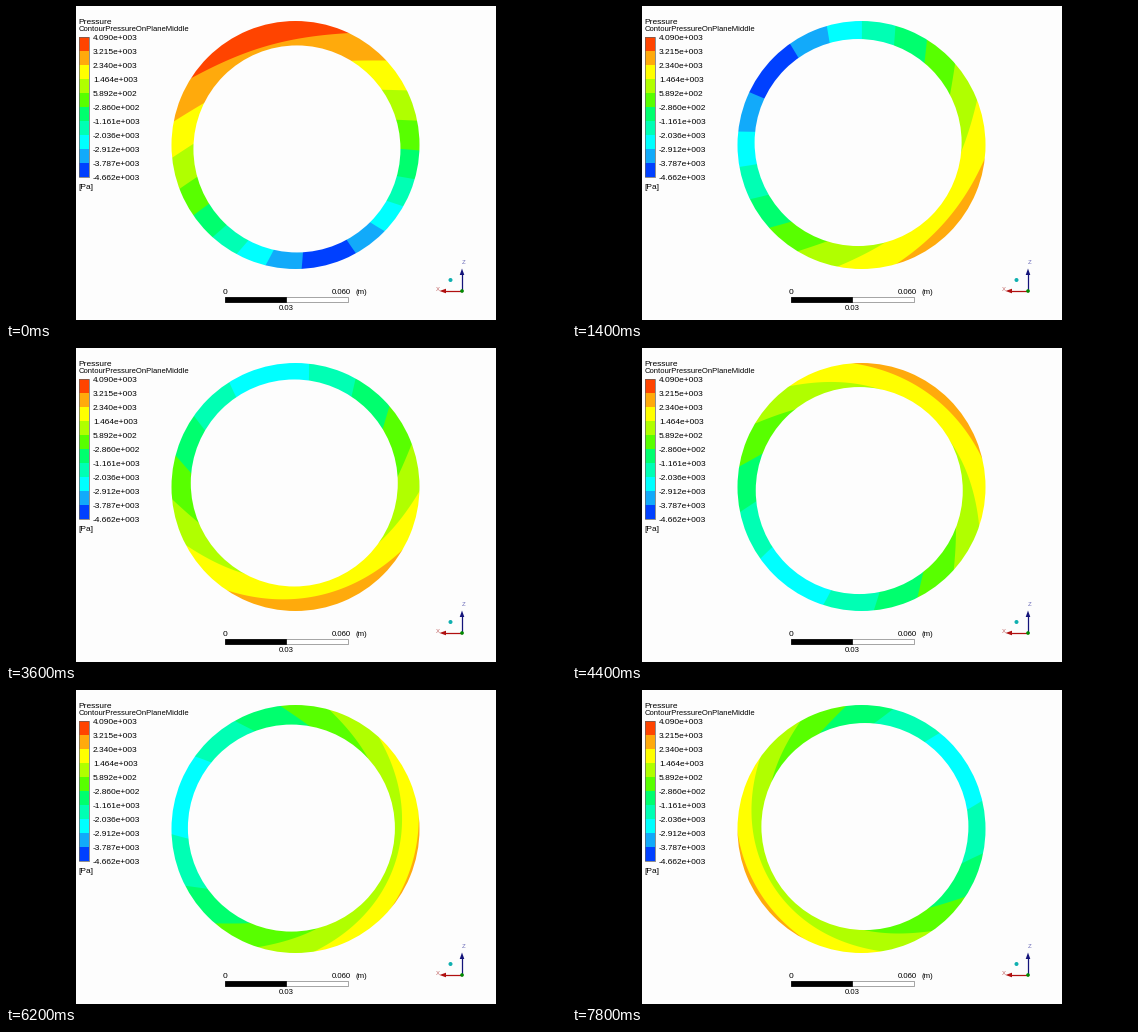
Animation of 560x314 px, one loop 8 s. Source, as a matplotlib script:

```python
import matplotlib.pyplot as plt
import numpy as np
from matplotlib.animation import FuncAnimation
from matplotlib.patches import Annulus, Circle, Polygon, Rectangle

W, H, DPI = 560, 314, 100
FRAMES, INTERVAL = 40, 200
CX, CY, R_OUT, R_IN = 289.5, 139, 124, 103.5
ORBIT = 4.2
PAPER = "#fdfdfd"

# Bands from the lowest to the highest pressure
COLORS = ["#0040ff", "#12aafa", "#00ffff", "#00ffb4", "#00ff6e",
          "#58ff00", "#b0ff00", "#ffff00", "#ffaa0c", "#ff4400"]
P_MAX, P_MIN = 4090, -4662

# Direction of the lowest pressure in degrees; the whirl is slightly uneven
WHIRL_FRAMES = [0, 7, 11, 18, 27, 34, 39]
WHIRL_ANGLES = [74, -140, -248, -463, -757, -978, -1112]

fig = plt.figure(figsize=(W / DPI, H / DPI), dpi=DPI, facecolor="black")
ax = fig.add_axes([0, 0, 1, 1])
ax.set(xlim=(0, W), ylim=(H, 0))
ax.axis("off")


def box(x, y, w, h, color, edge="none"):
    ax.add_patch(Rectangle((x, y), w, h, fc=color, ec=edge, lw=0.5))


def label(x, y, text, px=8.4, color="black", ha="left"):
    ax.text(x, y, text, fontsize=px * 72 / DPI, color=color, ha=ha,
            va="baseline", family="Liberation Sans", zorder=5)


def arrow(x, y, dx, dy, color):
    ax.plot([x, x + dx * 18], [y, y + dy * 18], color=color, lw=0.9)
    tip = [(x + dx * 22.5, y + dy * 22.5)]
    for side in (-2.3, 2.3):
        tip.append((x + dx * 16 - dy * side, y + dy * 16 + dx * side))
    ax.add_patch(Polygon(tip, fc=color, ec="none", zorder=3))


def scientific(value):
    mantissa, power = f"{value:.3e}".split("e")
    return f"{mantissa}e{power[0]}{int(power[1:]):03d}"


box(70, 0, 420, H, PAPER)
label(72.2, 17.5, "Pressure")
label(72.2, 24.7, "ContourPressureOnPlaneMiddle", 7.6)
for i, color in enumerate(reversed(COLORS)):
    box(72.5, 31 + 14 * i, 10.5, 14, color)
box(72.5, 30.5, 10.5, 140, "none", "#606060")
for i, value in enumerate(np.linspace(P_MAX, P_MIN, len(COLORS) + 1)):
    label(87, 34 + 14 * i, scientific(value))
label(72.2, 183, "[Pa]")

box(219, 291, 123, 5, "white", "#808080")
box(219, 291, 61, 5, "black", "black")
label(219, 288, "0", ha="center")
label(335, 288, "0.060", 7.8, ha="center")
label(349, 288, "(m)", 7.8)
label(280.5, 303.5, "0.03", 7.8, ha="center")

arrow(456, 285, 0, -1, "#14147a")
arrow(456, 285, -1, 0, "#b01010")
ax.add_patch(Circle((456, 285), 1.8, fc="#008c00", ec="none", zorder=4))
ax.add_patch(Circle((444.5, 274), 2, fc="#10b0b0", ec="none"))
label(457.5, 258, "Z", 6, "#6a6ab8", "center")
label(431.5, 285, "X", 6, "#c06060", "center")

# The bands overshoot both edges; these covers trim them cleanly
ax.add_patch(Annulus((CX, CY), R_OUT + 6, 6, fc=PAPER, ec="none", zorder=3))
bore = ax.add_patch(Circle((CX, CY), R_IN, fc=PAPER, ec="none", zorder=3))

THETA = np.linspace(0, 2 * np.pi, 361)
UNIT = np.exp(1j * THETA)
DEPTH = np.linspace(-0.1, 1.1, 13)[:, None]


def pressure(frame, phase):
    """Pressure in band units at the bore and at the rim."""
    low = 0.5 + 2 / (1 + np.exp(14.5 - frame))
    high = 8.1 + 0.6 * np.sin(phase) ** 2 + 1.15 * np.exp(-frame / 3)
    gap = 0.85 + 0.018 * frame
    wave = np.abs(np.sin((THETA - phase) / 2))
    inner = low - 0.1 + (high - gap - low) * wave ** 1.2
    outer = low + (high - low) * wave ** 1.35
    return inner, outer


bands = []


def draw(frame):
    while bands:
        bands.pop().remove()
    phase = np.radians(np.interp(frame, WHIRL_FRAMES, WHIRL_ANGLES))
    hub = complex(CX, CY) + ORBIT * np.exp(1j * (phase - 0.07))
    bore.center = hub.real, hub.imag
    near, far = hub + R_IN * UNIT, complex(CX, CY) + R_OUT * UNIT
    inner, outer = pressure(frame, phase)
    z = near + (far - near) * DEPTH
    p = np.clip(inner + (outer - inner) * DEPTH, 0.01, 9.99)
    # Each band covers all higher ones too, so no seams show
    for k, color in enumerate(COLORS):
        if p.max() > k:
            bands.append(ax.contourf(z.real, z.imag, p, levels=[k, 20],
                                     colors=[color], antialiased=True, zorder=2))
    ax.set(xlim=(0, W), ylim=(H, 0))
    return bands


anim = FuncAnimation(fig, draw, frames=FRAMES, interval=INTERVAL,
                     init_func=lambda: [], repeat=True, repeat_delay=0, blit=False)
plt.show()
```
